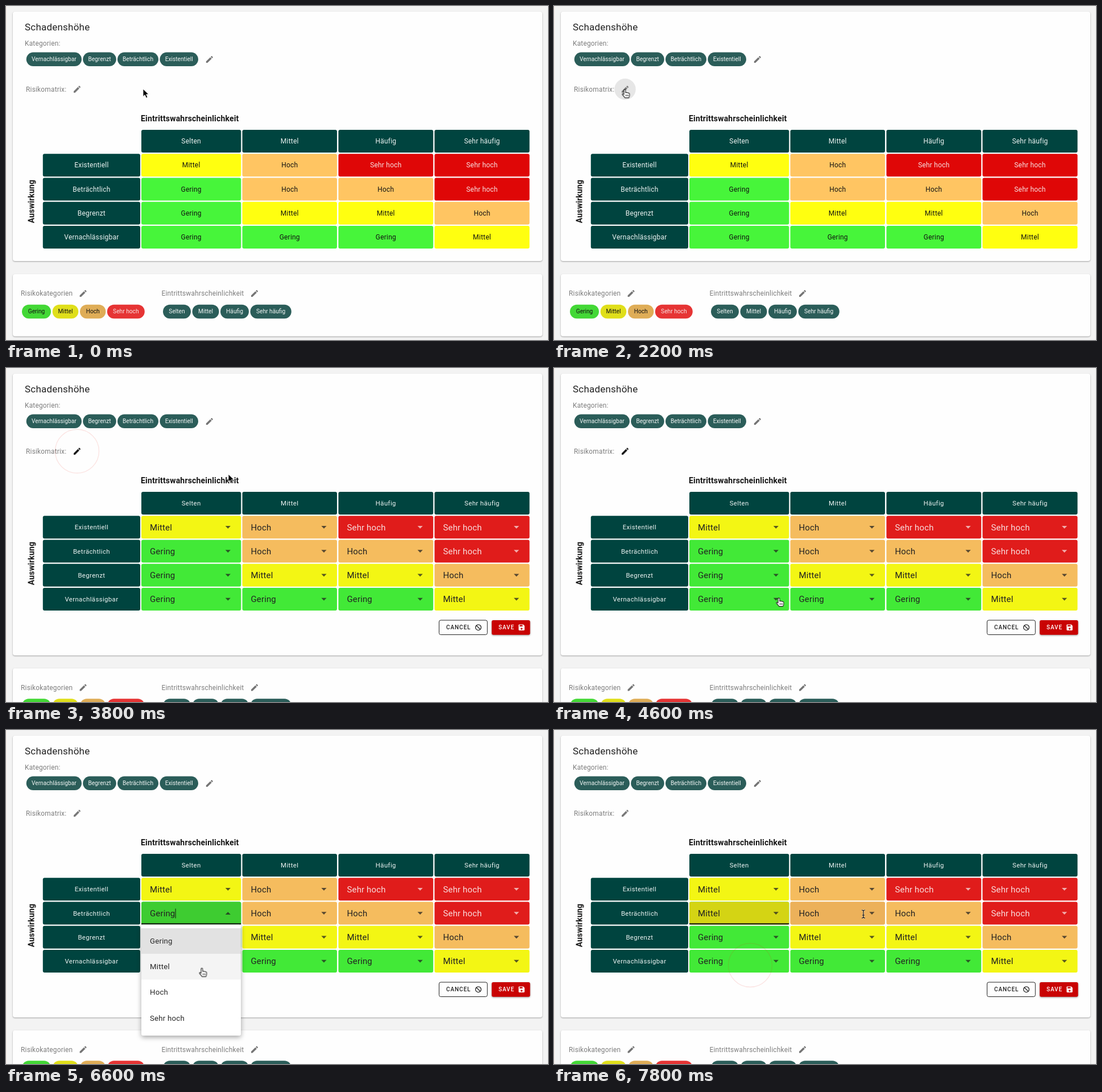
Write an HTML page that moves like this. It is 953 by 588 pixels and loops after 8000 ms.

```html
<!DOCTYPE html>
<html lang="de">
<head>
<meta charset="utf-8">
<title>Risikomatrix</title>
<style>
  html, body { margin: 0; width: 100%; height: 100%; overflow: hidden; background: #f3f3f3; }
  svg { display: block; width: 953px; height: 588px; font-family: Roboto, sans-serif; }
  .card { fill: #fefefe; filter: drop-shadow(0 1px 1.2px rgba(0, 0, 0, .34)); }
  .title { font-size: 17px; letter-spacing: .0125em; fill: #222; }
  .label { font-size: 11.9px; letter-spacing: .0178em; fill: #7d7d7d; }
  .bold { font-size: 14px; font-weight: 700; letter-spacing: .0125em; fill: #151515; }
  .chip { font-size: 10.2px; text-anchor: middle; }
  .cell { font-size: 12px; letter-spacing: .0178em; text-anchor: middle; }
  .head { font-size: 11.4px; letter-spacing: .0333em; text-anchor: middle; }
  .select { font-size: 15px; letter-spacing: .009em; }
  .item { font-size: 13.2px; letter-spacing: .0178em; fill: #262626; }
  .button { font-size: 10px; font-weight: 500; letter-spacing: .089em; }
  .raised { filter: drop-shadow(0 1px 1.5px rgba(0, 0, 0, .4)); }
  .menu { filter: drop-shadow(0 3px 4px rgba(0, 0, 0, .35)); }

  .lower { animation: lower 8s step-end infinite; }
  @keyframes lower {
    0% { transform: none; }
    40%, 100% { transform: translateY(56.5px); }
  }

  .ring { fill: none; stroke: #e8291c; opacity: 0; animation: ring 8s infinite; }
  @keyframes ring {
    0% { r: 5px; stroke-width: 3px; opacity: 1; animation-timing-function: steps(4); }
    10% { r: 38.5px; stroke-width: 1.4px; opacity: .12; animation-timing-function: step-end; }
    12.5%, 100% { r: 40px; opacity: 0; }
  }

  /* Every segment advances once per 200 ms. */
  .pointer { animation: pointer 8s infinite; }
  @keyframes pointer {
    0% { transform: translate(241px, 146px); animation-timing-function: step-end; }
    5% { transform: translate(241px, 146px); animation-timing-function: steps(4); }
    15% { transform: translate(121px, 147px); animation-timing-function: step-end; }
    20% { transform: translate(124.5px, 147px); animation-timing-function: step-end; }
    40% { transform: translate(124.5px, 147px); animation-timing-function: steps(3); }
    47.5% { transform: translate(391px, 187px); animation-timing-function: steps(4); }
    57.5% { transform: translate(395.5px, 405px); animation-timing-function: step-end; }
    60% { transform: translate(395.5px, 405px); animation-timing-function: steps(2); }
    65% { transform: translate(391px, 321px); animation-timing-function: step-end; }
    72.5% { transform: translate(391px, 321px); animation-timing-function: steps(4); }
    82.5% { transform: translate(344.5px, 419.5px); animation-timing-function: step-end; }
    85% { transform: translate(344.5px, 414px); animation-timing-function: step-end; }
    90% { transform: translate(344.5px, 414px); animation-timing-function: steps(3); }
    97.5%, 100% { transform: translate(544px, 324px); animation-timing-function: step-end; }
  }
</style>
</head>
<body>
<script>
const LOOP = 8000;
const DARK = '#00443f', CHIP = '#2b5d59';
const LEVELS = {
  'Gering':    { view: '#47f53a', edit: '#42e937', chip: '#43d836', ink: '#111' },
  'Mittel':    { view: '#ffff10', edit: '#f3f614', chip: '#e0df1a', ink: '#111' },
  'Hoch':      { view: '#ffc562', edit: '#f5bc5e', chip: '#dfad57', ink: '#111' },
  'Sehr hoch': { view: '#df0707', edit: '#e01c1b', chip: '#e63434', ink: '#f8e4e4' },
};
const COLUMNS = [[238, 175.3], [415.5, 166.5], [584.5, 166.7], [753.5, 167]];
const LIKELIHOODS = ['Selten', 'Mittel', 'Häufig', 'Sehr häufig'];
const IMPACTS = ['Existentiell', 'Beträchtlich', 'Begrenzt', 'Vernachlässigbar'];
const MATRIX = [
  ['Mittel', 'Hoch', 'Sehr hoch', 'Sehr hoch'],
  ['Gering', 'Hoch', 'Hoch', 'Sehr hoch'],
  ['Gering', 'Mittel', 'Mittel', 'Hoch'],
  ['Gering', 'Gering', 'Gering', 'Mittel'],
];

const rowY = row => 218 + 42.25 * row;
const rect = (x, y, w, h, fill, rx = 0, extra = '') =>
  `<rect x="${x}" y="${y}" width="${w}" height="${h}" rx="${rx}" fill="${fill}" ${extra}/>`;
const text = (x, y, cls, content, fill) =>
  `<text x="${x}" y="${y}" class="${cls}" ${fill ? `style="fill:${fill}"` : ''}>${content}</text>`;
const during = (spans, content) => `<g data-on="${spans}">${content}</g>`;
const card = (y, h) => rect(12, y, 931, h, '#fefefe', 4, 'class="card"');

const pencil = (x, y, fill = '#757575') =>
  `<path transform="translate(${x - 8} ${y - 8}) scale(.667)" fill="${fill}" d="M3 17.25V21h3.75L17.81 9.94l-3.75-3.75zM20.71 7.04a1 1 0 0 0 0-1.41l-2.34-2.34a1 1 0 0 0-1.41 0l-1.83 1.83 3.75 3.75z"/>`;

const chip = (x, y, w, label, fill = CHIP, ink = '#f2f6f5') =>
  rect(x, y, w, 24.4, fill, 12.2) + text(x + w / 2, y + 15.6, 'chip', label, ink);

function headCells(cls) {
  const cell = (x, w, row, label) =>
    rect(x, rowY(row), w, 40, DARK, 3) + text(x + w / 2, rowY(row) + 24, cls, label, '#eef4f3');
  return COLUMNS.map(([x, w], i) => cell(x, w, 0, LIKELIHOODS[i])).join('') +
    IMPACTS.map((label, i) => cell(64.8, 171.2, i + 1, label)).join('');
}

function viewCell(level, row, col) {
  const [x, w] = COLUMNS[col], y = rowY(row + 1), { view, ink } = LEVELS[level];
  return rect(x, y, w, 40, view, 3) + text(x + w / 2, y + 24, 'cell', level, ink);
}

function selectCell(level, row, col, { fill = LEVELS[level].edit, open = false, focus = false } = {}) {
  const [x, w] = COLUMNS[col], y = rowY(row + 1);
  const ink = level === 'Sehr hoch' ? '#f8dcdc' : '#222';
  const arrow = open ? 'm-4.6 2.4h9.2l-4.6-4.6z' : 'm-4.6-2.2h9.2l-4.6 4.6z';
  return rect(x, y, w, 40, fill, 3) +
    text(x + 15, y + 25.3, 'select', level, ink) +
    `<path d="M${x + w - 23} ${y + 20}${arrow}" fill="${ink}" opacity=".75"/>` +
    (focus ? rect(x, y + 37.8, w, 2, '#111') : '') +
    (open ? rect(297.6, y + 12, 1, 17, '#111') : '');
}

const matrix = draw => MATRIX.map((row, r) => row.map((level, c) => draw(level, r, c)).join('')).join('');

const buttons =
  rect(761.5, 444, 84.8, 25.5, '#fefefe', 3, 'stroke="#222"') +
  text(774, 460.4, 'button', 'CANCEL', '#222') +
  `<g fill="none" stroke="#222" stroke-width="1.3"><circle cx="830.5" cy="456.7" r="4.9"/><path d="M827 453.2l7 7"/></g>` +
  rect(854, 444, 67.5, 25.7, '#c90303', 3, 'class="raised"') +
  text(866, 460.4, 'button', 'SAVE', '#fff') +
  `<path transform="translate(899.6 449.7) scale(.58)" fill="#fff" fill-rule="evenodd" d="M17 3H5a2 2 0 0 0-2 2v14a2 2 0 0 0 2 2h14a2 2 0 0 0 2-2V7zM15 9H6V5h9zM12 13a3 3 0 1 0 0 6a3 3 0 0 0 0-6z"/>`;

const menu = `<g class="menu">${rect(238, 342.5, 175, 195.5, '#fff', 3)}</g>` +
  rect(238, 349, 175, 45.2, '#e2e2e2') +
  during('6200-7200', rect(238, 394.2, 175, 45.2, '#f4f4f4')) +
  Object.keys(LEVELS).map((level, i) => text(253, 376 + 45.2 * i, 'item', level)).join('');

const upper =
  text(33, 43, 'title', 'Schadenshöhe') +
  text(33, 70.4, 'label', 'Kategorien:') +
  chip(35.7, 81.6, 97.3, 'Vernachlässigbar') + chip(135.2, 81.6, 58.6, 'Begrenzt') +
  chip(196, 81.6, 72, 'Beträchtlich') + chip(270.4, 81.6, 67.6, 'Existentiell') +
  pencil(357.8, 94) +
  text(35, 150.6, 'label', 'Risikomatrix:') +
  during('1600-3000', '<circle cx="125" cy="146.5" r="18.7" fill="#e6e6e6"/>') +
  during('3000-3200', '<circle cx="125" cy="146.5" r="18.7" fill="#d0d0d0"/>') +
  during('0-3200,5400-8000', pencil(125, 146.5)) +
  during('3200-5400', pencil(125, 146.5, '#151515')) +
  text(237, 202.6, 'bold', 'Eintrittswahrscheinlichkeit') +
  `<g transform="translate(49.5 344) rotate(-90)" text-anchor="middle">${text(0, 0, 'bold', 'Auswirkung')}</g>`;

const riskChips = [[28, 51], [81.7, 45.6], [130, 45.4], [177.8, 66]];
const likelihoodChips = [[276, 49], [327.5, 47], [377, 50], [429.5, 72.3]];
const lower = `<g class="lower">` + card(472, 109.5) +
  text(26, 510.2, 'label', 'Risikokategorien') + pencil(135.6, 506) +
  text(273.5, 510.2, 'label', 'Eintrittswahrscheinlichkeit') + pencil(437, 506) +
  Object.entries(LEVELS).map(([name, level], i) =>
    chip(riskChips[i][0], 525.8, riskChips[i][1], name, level.chip, level.ink)).join('') +
  LIKELIHOODS.map((name, i) => chip(likelihoodChips[i][0], 525.8, likelihoodChips[i][1], name)).join('') +
  `</g>`;

const ring = (x, y, start) => `<circle class="ring" cx="${x}" cy="${y}" r="5" style="animation-delay:${start}ms"/>`;

const pointer = `<g class="pointer">` +
  during('0-1600,3200-4200',
    '<path d="M0 0V13.5L3.2 10.6 5.4 15.8 7.9 14.7 5.7 9.7H10Z" fill="#000" stroke="#fff" stroke-width=".9"/>') +
  during('1600-3200,4200-7400',
    `<g fill="#fff" stroke="#222" stroke-width="1.1" stroke-linejoin="round">
      <path d="M-1.5 1.2C-1.5-.5 1.2-.5 1.3 1.2V5.5Q2.8 4.6 3.9 5.8 5.4 5 6.4 6.4 8.3 6 8.3 8V10.5Q8 13 7 14.6H0Q-1 12.5-4 9.5-5 7.5-3.3 7.3L-1.5 8.8Z"/>
      <path d="M1.8 9v3M3.8 9v3M5.8 9v3" stroke-width=".8"/></g>`) +
  during('7400-8000',
    `<g fill="none"><path id="beam" d="M-3-7Q0-7 0-5 0-7 3-7M0-5V5M-3 7Q0 7 0 5 0 7 3 7M-2 2H2" stroke="#fff" stroke-width="2.4" opacity=".5"/>
      <path d="M-3-7Q0-7 0-5 0-7 3-7M0-5V5M-3 7Q0 7 0 5 0 7 3 7M-2 2H2" stroke="#111" stroke-width="1.2"/></g>`) +
  `</g>`;

document.body.innerHTML = `<svg viewBox="0 0 953 588">` +
  rect(0, 0, 953, 588, '#f3f3f3') + rect(0, 0, 1, 588, '#f8ebe6') +
  during('0-3200', card(10, 439)) + during('3200-8000', card(10, 496)) +
  lower + upper +
  during('0-3200', headCells('cell') + matrix(viewCell)) +
  during('3200-8000', headCells('head') + matrix(selectCell) + buttons) +
  during('5200-5400', selectCell('Gering', 1, 0, { fill: '#3fdc34' })) +
  during('5400-7200', selectCell('Gering', 1, 0, { fill: '#3ecc31', open: true, focus: true })) +
  during('7200-8000', selectCell('Mittel', 1, 0, { fill: '#d4d414', focus: true })) +
  during('7600-8000', selectCell('Hoch', 1, 1, { fill: '#ecb15a' })) +
  during('5600-7200', menu) +
  ring(125, 146.5, 3000) + ring(391, 321, 5400) + ring(345, 414, 7000) +
  pointer + `</svg>`;

// Turn each data-on list of time spans into a stepped opacity animation.
const sheet = document.createElement('style');
document.querySelectorAll('[data-on]').forEach((el, i) => {
  const at = (ms, opacity) => `${ms / LOOP * 100}%{opacity:${opacity}}`;
  const spans = el.dataset.on.split(',').map(span => span.split('-'));
  sheet.textContent += `@keyframes on${i}{${at(0, 0)}${spans.map(([a, b]) => at(a, 1) + at(b, 0)).join('')}}`;
  el.style.animation = `on${i} ${LOOP}ms step-end infinite`;
});
document.head.append(sheet);
</script>
</body>
</html>
```
